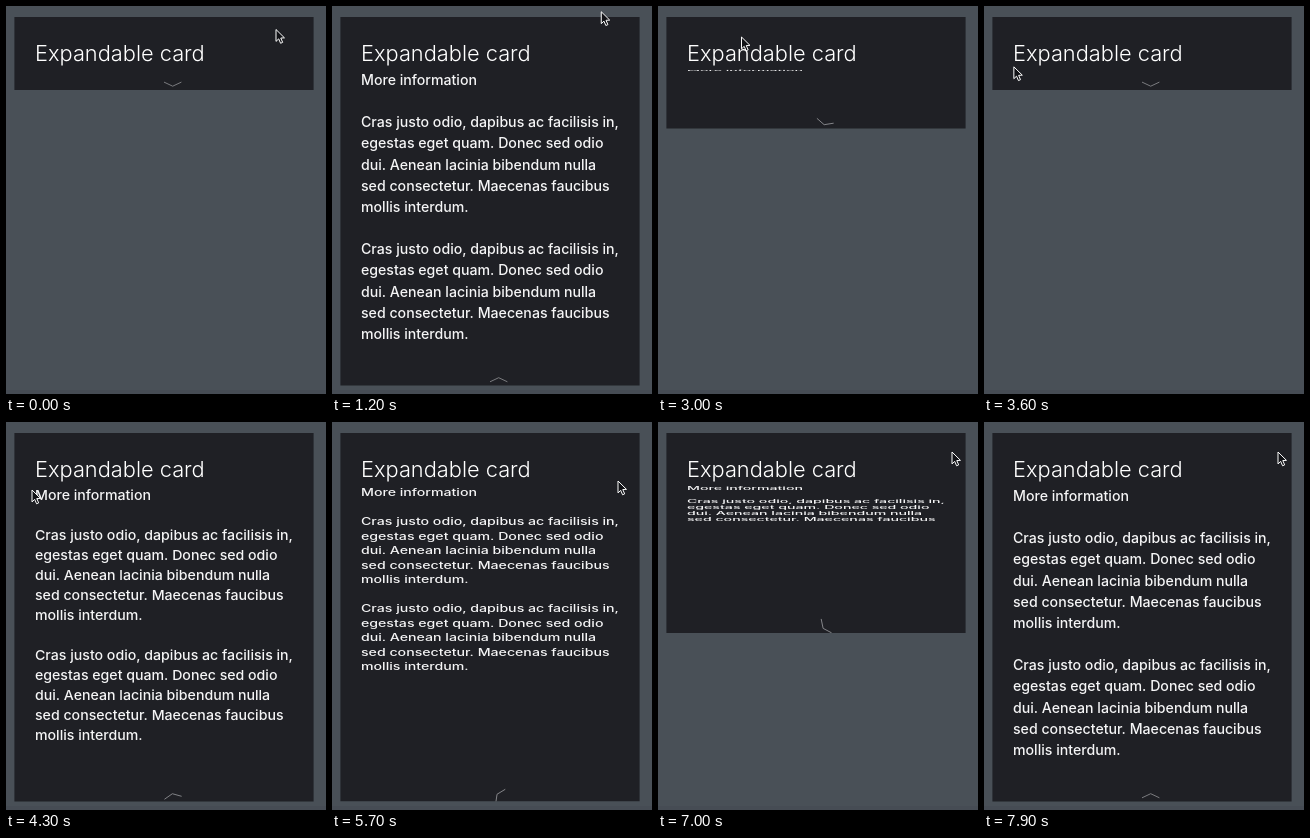
Recreate the animation shown at these times as an HTML page with a canvas. Size 320 px wide and 388 px high, loop 8000 ms.

```html
<!DOCTYPE html>
<html lang="en">
<head>
<meta charset="utf-8">
<title>Expandable card</title>
<style>
  html, body { margin: 0; width: 100%; height: 100%; overflow: hidden; background: #495057; }
  canvas { display: block; width: 320px; height: 388px; }
</style>
</head>
<body>
<canvas id="stage"></canvas>
<script>
const W = 320, H = 388, LOOP = 8000, STEP = 100;
const CARD = { x: 8.4, y: 11, w: 299.2, header: 73 };
const CONTENT = { x: 29, top: 63.5, height: 295.5, maxHeight: 430, line: 21.15 };
const DURATION = 250;

const paragraph = [
  'Cras justo odio, dapibus ac facilisis in,',
  'egestas eget quam. Donec sed odio',
  'dui. Aenean lacinia bibendum nulla',
  'sed consectetur. Maecenas faucibus',
  'mollis interdum.'
];
const lines = ['More information', '', ...paragraph, '', ...paragraph];

// The card starts closed; every click flips it.
const clicks = [950, 2840, 4122, 5648, 6950];

// Pointer moves between resting places; bow bends the way up or down.
const home = { x: 269.5, y: 22.5 };
const moves = [
  { from: 900, to: 1500, x: 268, y: 23, bow: -18 },
  { from: 1700, to: 2440, x: 83, y: 30, bow: 0 },
  { from: 3350, to: 3740, x: 7, y: 62, bow: 8 },
  { from: 3950, to: 4300, x: 25.5, y: 67, bow: 0 },
  { from: 4650, to: 5500, x: 285.5, y: 58, bow: -18 },
  { from: 6450, to: 6950, x: 293.5, y: 29, bow: -25 }
];

const canvas = document.getElementById('stage');
const ctx = canvas.getContext('2d');
const ratio = window.devicePixelRatio || 1;
canvas.width = W * ratio;
canvas.height = H * ratio;

const clamp = v => Math.min(1, Math.max(0, v));
const smooth = k => k * k * (3 - 2 * k);

// cubic-bezier(.25, .1, .25, 1), the CSS "ease" curve
function ease(x) {
  if (x <= 0 || x >= 1) return clamp(x);
  const bezier = (s, a, b) => 3 * s * (1 - s) ** 2 * a + 3 * s * s * (1 - s) * b + s ** 3;
  let lo = 0, hi = 1;
  for (let i = 0; i < 24; i++) {
    const mid = (lo + hi) / 2;
    if (bezier(mid, .25, .25) < x) lo = mid; else hi = mid;
  }
  return bezier(lo, .1, 1);
}

function openness(t) {
  return clicks.reduce((open, click, i) =>
    open + (i % 2 ? -1 : 1) * ease((t - click) / DURATION), 0);
}

function pointerAt(t) {
  return moves.reduce((p, move) => {
    const k = clamp((t - move.from) / (move.to - move.from));
    return {
      x: p.x + (move.x - p.x) * smooth(k),
      y: p.y + (move.y - p.y) * smooth(k) + move.bow * Math.sin(Math.PI * k)
    };
  }, home);
}

function polyline(points) {
  ctx.beginPath();
  points.forEach(([x, y]) => ctx.lineTo(x, y));
}

function drawContent(open, height) {
  ctx.save();
  ctx.translate(CONTENT.x, CONTENT.top);
  ctx.scale(1, open);
  ctx.beginPath();
  ctx.rect(-2, 0, 280, height);
  ctx.clip();
  ctx.font = '500 14.15px Inter, sans-serif';
  ctx.fillStyle = '#f5f5f6';
  lines.forEach((text, i) => ctx.fillText(text, 0, 15.5 + i * CONTENT.line));
  ctx.restore();
}

function drawChevron(open, bottom) {
  ctx.save();
  ctx.translate(166.7, bottom - 5.8);
  ctx.rotate(open * Math.PI);
  polyline([[-8.7, -2.1], [0, 2], [8.7, -2.1]]);
  ctx.strokeStyle = '#85868a';
  ctx.lineWidth = .9;
  ctx.stroke();
  ctx.restore();
}

function drawPointer({ x, y }) {
  ctx.save();
  ctx.translate(x + .5, y + 1);
  ctx.scale(.9, .9);
  polyline([[0, 0], [0, 13.2], [3, 10.4], [5.1, 15.3], [7.4, 14.3], [5.3, 9.5], [9.4, 9.3]]);
  ctx.closePath();
  ctx.fillStyle = '#111216';
  ctx.fill();
  ctx.strokeStyle = '#fff';
  ctx.lineWidth = 1.1;
  ctx.stroke();
  ctx.restore();
}

function draw(t) {
  const open = openness(t);
  const height = Math.min(CONTENT.height, CONTENT.maxHeight * open);
  const cardHeight = CARD.header + height;

  ctx.setTransform(ratio, 0, 0, ratio, 0, 0);
  ctx.fillStyle = '#495057';
  ctx.fillRect(0, 0, W, H);
  ctx.fillStyle = '#464c54';
  ctx.fillRect(0, 384, W, 4);

  ctx.save();
  ctx.beginPath();
  ctx.rect(CARD.x, CARD.y, CARD.w, cardHeight);
  ctx.clip();
  ctx.fillStyle = '#1f2025';
  ctx.fillRect(0, 0, W, H);
  ctx.font = '300 21.8px Inter, sans-serif';
  ctx.fillStyle = '#fff';
  ctx.fillText('Expandable card', CONTENT.x, 54.5);
  if (open > .001) drawContent(open, height);
  drawChevron(open, CARD.y + cardHeight);
  ctx.restore();

  drawPointer(pointerAt(t));
}

function tick() {
  const t = performance.now() % LOOP;
  draw(Math.floor(t / STEP) * STEP);
  requestAnimationFrame(tick);
}
tick();
</script>
</body>
</html>
```
